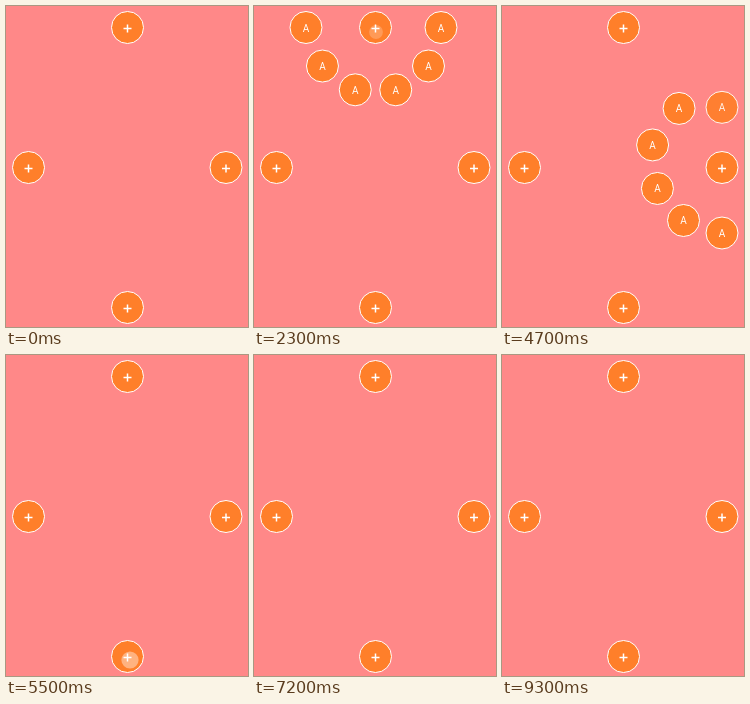
Write an HTML page with a canvas that moves like this. It is 242 px wide and 321 px high and loops after 9700 ms.

```html
<!DOCTYPE html>
<html lang="en">
<head>
<meta charset="utf-8">
<title>Arc menus</title>
<style>
  html, body { margin: 0; width: 100%; height: 100%; overflow: hidden; background: #ff8888; }
  canvas { display: block; }
</style>
</head>
<body>
<canvas id="stage" width="242" height="321"></canvas>
<script>
const ctx = document.getElementById('stage').getContext('2d');

const LOOP = 9700, STEP = 100;
const ITEMS = 6, RADIUS = 65.5, DURATION = 260, LAG = 49;
const RELEASE_LEAD = 50, TOUCH_FADE = 200;

// Each menu fans out clockwise from `angle`; taps are { down, start, x, y }.
const menus = [
  { x: 121.5, y: 21.5, angle: 0,
    open: { down: 900, start: 1120, x: 132, y: 22 },
    close: { down: 2100, start: 2245, x: 122, y: 26 } },
  { x: 220, y: 161.5, angle: 90,
    open: { down: 3300, start: 3443, x: 226, y: 166.5 },
    close: { down: 4300, start: 4513, x: 226, y: 166.5 } },
  { x: 121.5, y: 301.5, angle: 180,
    open: { down: 5400, start: 5530, x: 124, y: 305 },
    close: { down: 6400, start: 6620, x: 124, y: 305 } },
  { x: 22.5, y: 161.5, angle: 270,
    open: { down: 7500, start: 7720, x: 35, y: 164 },
    close: { down: 8600, start: 8730, x: 31, y: 165 } },
];

const clamp = v => Math.min(1, Math.max(0, v));
const anticipate = u => u * u * (3 * u - 2);
const overshoot = u => 1 - anticipate(1 - u);

function disc(x, y) {
  ctx.beginPath();
  ctx.arc(x, y, 16, 0, 2 * Math.PI);
  ctx.fillStyle = '#ff7f2a';
  ctx.fill();
  ctx.strokeStyle = '#fff';
  ctx.lineWidth = 1;
  ctx.stroke();
}

function drawItem(x, y) {
  disc(x, y);
  ctx.fillStyle = '#fff';
  ctx.fillText('A', x, y + 4);
}

function drawButton({ x, y }) {
  disc(x, y);
  ctx.fillStyle = '#fff';
  ctx.fillRect(x - 4, y + 0.25, 8, 1.5);
  ctx.fillRect(x - 0.75, y - 3, 1.5, 8);
}

function spread(menu, i, t) {
  const { open, close } = menu;
  if (t < close.start) return overshoot(clamp((t - open.start - i * LAG) / DURATION));
  return 1 - anticipate(clamp((t - close.start - (ITEMS - 1 - i) * LAG) / DURATION));
}

function drawItems(menu, t) {
  for (let i = 0; i < ITEMS; i++) {
    const value = spread(menu, i, t);
    if (value <= 0) continue;
    const angle = (menu.angle + i * 180 / (ITEMS - 1)) * Math.PI / 180;
    ctx.globalAlpha = clamp(value);
    drawItem(menu.x + RADIUS * value * Math.cos(angle),
             menu.y + RADIUS * value * Math.sin(angle));
  }
  ctx.globalAlpha = 1;
}

function drawTouch({ down, start, x, y }, t) {
  const fade = clamp((t - start + RELEASE_LEAD) / TOUCH_FADE);
  if (t < down || fade === 1) return;
  ctx.beginPath();
  ctx.arc(x, y, 9 - 4 * fade, 0, 2 * Math.PI);
  ctx.fillStyle = `rgba(255, 255, 255, ${0.45 * (1 - fade)})`;
  ctx.fill();
}

function draw(t) {
  ctx.fillStyle = '#ff8888';
  ctx.fillRect(0, 0, 242, 321);
  ctx.font = '10px Roboto, sans-serif';
  ctx.textAlign = 'center';
  for (const menu of menus) {
    drawItems(menu, t);
    drawButton(menu);
    drawTouch(menu.open, t);
    drawTouch(menu.close, t);
  }
}

// The picture advances at ten steps per second.
const origin = performance.now();
function tick() {
  const t = (performance.now() - origin) % LOOP;
  draw(Math.floor(t / STEP) * STEP);
  requestAnimationFrame(tick);
}
tick();
</script>
</body>
</html>
```
